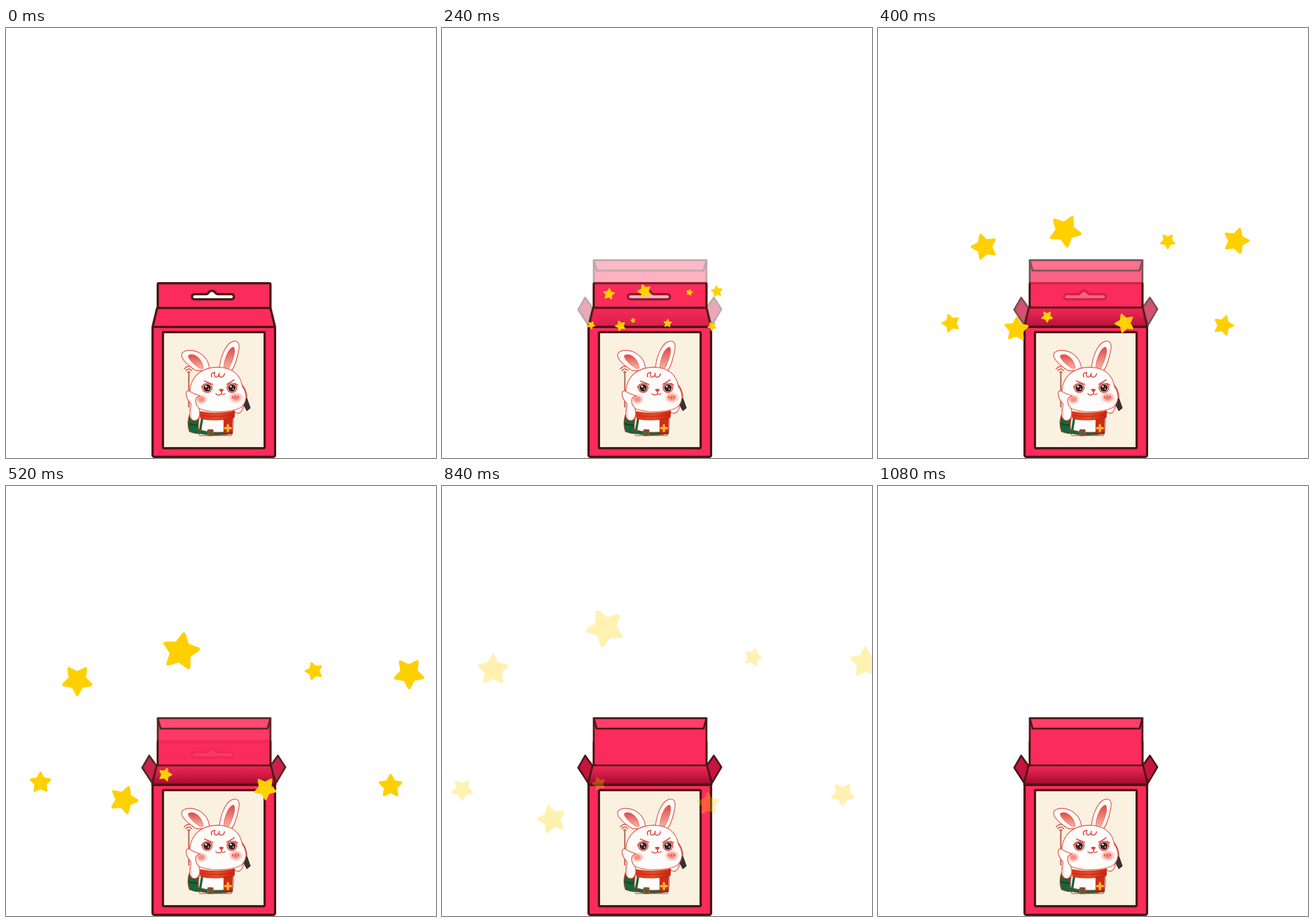
These frames come from a looping animation (748x748 px, 1120 ms). An HTML page:

```html
<!DOCTYPE html>
<html lang="en">
<head>
<meta charset="utf-8">
<title>Surprise box</title>
<style>
html, body { margin: 0; width: 100%; height: 100%; overflow: hidden; background: #fff; }
svg { display: block; width: 100%; height: 100%; }
.box { stroke: #4a1716; stroke-width: 4; stroke-linejoin: round; fill: #fb2b5b; }
.flap { stroke-width: 3.2; }
.skin { fill: #fffdfb; stroke: #e8584a; stroke-width: 1.4; stroke-linejoin: round; }
.line { fill: none; stroke: #df3b32; stroke-width: 1.6; stroke-linecap: round; }
</style>
</head>
<body>
<svg viewBox="0 0 748 748">
  <defs>
    <linearGradient id="inside" x2="0" y2="1">
      <stop offset="0" stop-color="#ee2856"/>
      <stop offset=".4" stop-color="#d51d49"/>
      <stop offset="1" stop-color="#a00c31"/>
    </linearGradient>
    <linearGradient id="earFill" x2="0" y2="1">
      <stop offset="0" stop-color="#df4a45"/>
      <stop offset="1" stop-color="#f8b5a6"/>
    </linearGradient>
    <radialGradient id="blush">
      <stop offset=".35" stop-color="#f58e80"/>
      <stop offset="1" stop-color="#fac0b0" stop-opacity=".15"/>
    </radialGradient>
    <linearGradient id="scarf" x2="1">
      <stop offset="0" stop-color="#d9301b"/>
      <stop offset=".5" stop-color="#e94a25"/>
      <stop offset="1" stop-color="#c9220f"/>
    </linearGradient>
    <g id="eye">
      <ellipse rx="8.5" ry="8" fill="#f7c3b8" stroke="#dc453b" stroke-width="1.5"/>
      <circle r="6.3" fill="#362120"/>
      <circle cx="-2" cy="-2.5" r="1.7" fill="#fff"/>
      <circle cx="2.3" cy="2" r="1.2" fill="#e5c9c4"/>
    </g>
  </defs>

  <g class="box">
    <rect x="264" y="444" width="196" height="43" rx="2"/>
    <path d="M263 487H460L468 520H255Z"/>
    <path fill="#fff" d="M328 463H349C352 463 352 457 358 457S364 463 368 463H392C398 463 398 472 392 472H328C322 472 322 463 328 463Z"/>
    <rect x="255" y="520" width="213" height="226" rx="3"/>
    <rect x="273" y="529" width="177" height="202" rx="2" style="fill:#fbf1e1"/>
  </g>

  <g id="rabbit">
    <path d="M318 599V660" stroke="#b9715c" stroke-width="2.6"/>
    <path class="line" d="M310 593Q318 584 326 593M313 596Q318 590 323 596M316 599Q318 596 320 599"/>
    <path d="M407 617Q418 626 419 643" class="line"/>
    <path d="M411 651L419 644L425 661L419 666Z" fill="#3d302f" stroke="#291e1e"/>
    <path d="M319 673Q314 689 319 702Q330 707 342 705V673Z" fill="#17663a" stroke="#b5402c" stroke-width="1.3"/>
    <path d="M318 688Q328 693 340 690" fill="none" stroke="#0e4227" stroke-width="2"/>
    <path class="skin" d="M338 671Q332 692 337 709H392Q398 693 394 672Z"/>
    <path d="M341 680L338 699" stroke="#17663a" stroke-width="4"/>
    <path d="M333 698Q361 707 394 701V706Q361 711 334 705Z" fill="#17663a" stroke="#913b25"/>
    <rect x="351" y="699" width="9" height="10" rx="1" fill="#2b7045" stroke="#d33b22" stroke-width="2"/>
    <path class="skin" d="M396 667Q407 676 413 660L409 646Q395 652 394 662Z"/>
    <path class="skin" d="M331 596C318 588 302 575 306 566C312 558 328 560 338 566C350 574 354 585 354 596Z"/>
    <path d="M338 592C328 587 316 575 317 570C324 564 341 572 343 592Z" fill="url(#earFill)" stroke="#e7665a"/>
    <path class="skin" d="M371 595C372 575 381 549 395 545C404 543 407 550 405 560C402 576 398 591 390 599Z"/>
    <path d="M379 592C379 575 388 555 396 555C401 561 394 581 386 594Z" fill="url(#earFill)" stroke="#e7665a"/>
    <path class="skin" d="M320 630C322 606 340 590 369 590C395 591 408 604 411 623C421 637 418 652 409 660C390 670 351 670 334 661C321 655 316 642 320 630Z"/>
    <path d="M337 660Q370 674 406 660Q384 667 365 666Q345 665 337 660Z" fill="#f9dfcc"/>
    <path class="line" d="M358 607Q355 600 363 599Q361 609 367 607Q371 605 371 600Q369 609 376 607Q380 605 380 601"/>
    <ellipse cx="340" cy="646" rx="11" ry="9" fill="url(#blush)"/>
    <ellipse cx="400" cy="643" rx="13" ry="10" fill="url(#blush)"/>
    <path class="line" d="M394 643V641M399 644V642M404 643V641" stroke-width="1"/>
    <use href="#eye" x="350" y="626"/>
    <use href="#eye" x="393" y="626"/>
    <path class="line" d="M345 614L360 620M384 620L397 612M340 625L344 620M398 618L403 621" stroke-width="2"/>
    <path d="M370 629Q375 626 379 629L375 634Z" fill="#df4139"/>
    <path class="line" d="M375 633V636M365 636Q370 641 375 636Q378 639 381 636"/>
    <path d="M336 667Q367 673 398 666L397 678Q368 685 339 680Z" fill="url(#scarf)" stroke="#c83a22"/>
    <path d="M340 674Q367 678 395 673" fill="none" stroke="#b72613"/>
    <path d="M379 681L394 679L393 702Q387 707 379 703Z" fill="#d52c18" stroke="#a92313"/>
    <path d="M386 691V701M381 696H391" stroke="#f7b82e" stroke-width="4" stroke-linecap="round"/>
    <path class="skin" d="M320 632C308 628 314 646 322 654Q319 666 320 676C325 687 336 684 337 671Q337 661 332 657C328 648 329 642 338 640C332 638 325 636 320 632Z"/>
    <path d="M323 655Q321 667 323 678" fill="none" stroke="#f6d4c4" stroke-width="2"/>
  </g>

  <g id="open" class="box flap">
    <path d="M264 404H460V487H264Z"/>
    <path d="M264 404H460L455 422H269Z" style="fill:#ff3e6b"/>
    <path d="M249 469L262 487L254 516L237 490Z" style="fill:#c5143f"/>
    <path d="M473 469L486 489L470 516L460 487Z" style="fill:#c5143f"/>
    <path d="M262 486H461L469 519H254Z" style="fill:url(#inside)"/>
  </g>
  <g id="stars" fill="#ffd000" stroke="#ffd000" stroke-width=".2" stroke-linejoin="round"></g>
</svg>
<script>
const STEP = 40, LOOP = 1120, START = 160;
const KEYS = [0, 4, 9, 12, 15, 18];
// radius, angle, spin direction, then x and y along the flight
const STARS = [
  [27, 36, -1, [346, 237, 124, 100, 89], [509, 420, 338, 326, 320]],
  [33, 10, -1, [364, 340, 304, 289, 284], [511, 406, 288, 259, 247]],
  [16, -18, 1, [386, 470, 536, 539, 541], [509, 414, 322, 305, 298]],
  [27, 35, 1, [398, 553, 701, 726, 737], [508, 412, 326, 314, 307]],
  [19, 0, 1, [335, 190, 60, 43, 35], [523, 513, 516, 524, 528]],
  [25, 21, 1, [350, 274, 205, 195, 191], [520, 517, 546, 570, 580]],
  [12, 18, -1, [355, 312, 277, 275, 273], [520, 502, 502, 514, 518]],
  [20, 34, -1, [373, 411, 451, 460, 463], [520, 510, 526, 546, 553]],
  [21, 0, -1, [396, 538, 669, 688, 697], [524, 516, 522, 531, 536]]
];

const openBox = document.getElementById('open');
const starGroup = document.getElementById('stars');
const clamp = v => Math.max(0, Math.min(1, v));

const starPoints = Array.from({ length: 10 }, (_, i) => {
  const r = i % 2 ? 0.48 : 0.92, a = i * Math.PI / 5;
  return `${(r * Math.sin(a)).toFixed(3)},${(-r * Math.cos(a)).toFixed(3)}`;
}).join(' ');

const coast = v => [...v, v[4] + 0.35 * (v[4] - v[3])];

const stars = STARS.map(([radius, angle, spin, xs, ys]) => {
  const node = document.createElementNS('http://www.w3.org/2000/svg', 'polygon');
  node.setAttribute('points', starPoints);
  starGroup.append(node);
  return { node, radius, angle, spin, xs: coast(xs), ys: coast(ys) };
});

// Smooth curve through the values without overshoot.
function along(values, f) {
  const last = KEYS.length - 1;
  const slope = i => (values[i + 1] - values[i]) / (KEYS[i + 1] - KEYS[i]);
  const tangent = i => {
    if (i === 0) return slope(0);
    if (i === last) return slope(last - 1);
    const a = slope(i - 1), b = slope(i);
    return a * b > 0 ? 2 * a * b / (a + b) : 0;
  };
  let i = 0;
  while (i < last - 1 && f > KEYS[i + 1]) i++;
  const h = KEYS[i + 1] - KEYS[i], u = (f - KEYS[i]) / h, w = 1 - u;
  return w * w * ((1 + 2 * u) * values[i] + u * h * tangent(i))
    + u * u * ((3 - 2 * u) * values[i + 1] - w * h * tangent(i + 1));
}

function render(time) {
  const tick = Math.floor((time % LOOP) / STEP) - START / STEP;
  const f = tick <= 11 ? tick : Math.max(11, tick - 2); // short pause at full burst
  openBox.setAttribute('opacity', tick < 0 ? 0 : 1 - 0.86 * clamp(1 - f / 11) ** 1.5);

  const alpha = f < 12 ? 1 : clamp(0.73 - 0.14 * (f - 12));
  const visible = tick >= 0 && f < 18 && alpha > 0;
  starGroup.setAttribute('opacity', visible ? alpha : 0);
  if (!visible) return;

  const grow = Math.min(1, 0.14 + 0.12 * f);
  for (const s of stars) {
    const turn = s.angle + s.spin * 6 * (f - 9);
    s.node.setAttribute('transform',
      `translate(${along(s.xs, f)} ${along(s.ys, f)}) rotate(${turn}) scale(${s.radius * grow})`);
  }
}

const begin = performance.now();
function loop() {
  render(performance.now() - begin);
  requestAnimationFrame(loop);
}
loop();
</script>
</body>
</html>
```
